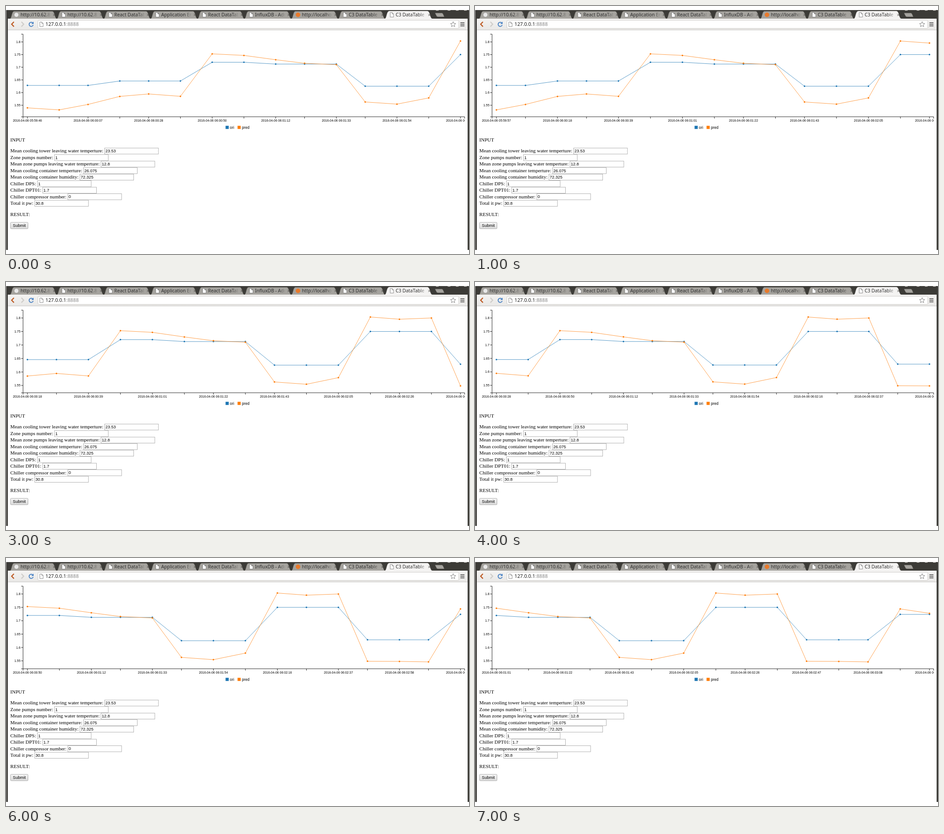
These frames come from a looping animation (1021 by 549 pixels, 8 s). An HTML page:

```html
<!DOCTYPE html>
<html lang="en">
<head>
<meta charset="utf-8">
<title>C3 DataTable</title>
<style>
html, body { margin: 0; width: 100%; height: 100%; overflow: hidden; background: #fff; }
svg { display: block; }
text { white-space: pre; }
.ui { font-family: "Noto Sans", sans-serif; }
.axis { font: 6.9px "Liberation Sans", sans-serif; }
.legend { font: 8.3px "Liberation Sans", sans-serif; }
.control { font: 9.2px "Liberation Sans", sans-serif; }
.page { font: 11.04px "Liberation Serif", serif; }
</style>
</head>
<body>
<svg width="1021" height="549" viewBox="0 0 1021 549">
  <defs>
    <linearGradient id="buttonFill" x2="0" y2="1"><stop stop-color="#f6f6f6"/><stop offset="1" stop-color="#dcdcdc"/></linearGradient>
    <linearGradient id="barFill" x2="0" y2="1"><stop stop-color="#f4f3f2"/><stop offset="1" stop-color="#e9e8e6"/></linearGradient>
    <clipPath id="plotClip"><rect y="54" width="1012" height="230"/></clipPath>
  </defs>
  <g id="browser" class="ui"></g>
  <g id="form"></g>
  <g id="chart" clip-path="url(#plotClip)"></g>
</svg>
<script>
const $ = id => document.getElementById(id);
const BLUE = '#1f77b4', ORANGE = '#ff7f0e';

const rect = (x, y, w, h, fill, more = '') =>
  `<rect x="${x}" y="${y}" width="${w}" height="${h}" fill="${fill}" ${more}/>`;
const path = (d, stroke, width = 1, fill = 'none') =>
  `<path d="${d}" stroke="${stroke}" stroke-width="${width}" fill="${fill}"/>`;
const text = (x, y, str, cls, more = '') =>
  `<text x="${x}" y="${y}" class="${cls}" ${more}>${str}</text>`;
const dot = (x, y, r, fill) => `<circle cx="${x}" cy="${y}" r="${r}" fill="${fill}"/>`;
const pageIcon = (x, y) =>
  path(`M${x} ${y}h4.5l3 3v7h-7.5zM${x + 4.5} ${y}v3h3`, '#777', 0.8, '#fafafa');

// Browser window
const tabs = ['http://10.62.8.', 'http://10.62.8.', 'React DataTab', 'Application Er', 'React DataTab',
  'InfluxDB - Adm', 'http://localhos', 'C3 DataTable', 'C3 DataTable'];

function drawTab(title, i) {
  const x = 8 + 103.4 * i, active = i === 8, fill = active ? '#f4f3f2' : '#a5a39e';
  const icon = i === 0 ? dot(x + 15, 19.5, 4.5, '#e8e8e8')
    : i === 6 ? dot(x + 15.5, 19.5, 5, '#e87a2c') : pageIcon(x + 12, 14.5);
  return `<clipPath id="tab${i}"><rect x="${x}" y="10" width="90" height="18"/></clipPath>
    <linearGradient id="fade${i}" gradientUnits="userSpaceOnUse" x1="${x + 76}" x2="${x + 92}">
      <stop stop-color="${fill}" stop-opacity="0"/><stop offset="1" stop-color="${fill}"/></linearGradient>`
    + path(`M${x} 28.5C${x + 5} 28 ${x + 4} 11.5 ${x + 10} 11.5H${x + 94}C${x + 100} 11.5 ${x + 99} 28 ${x + 105} 28.5`,
      active ? '#f4f3f2' : '#55534e', 0.8, fill)
    + text(x + 24, 23.4, title, '', `font-size="10.3" fill="#2e2e2e" clip-path="url(#tab${i})"`)
    + rect(x + 76, 13, 16, 14, `url(#fade${i})`) + icon
    + path(`M${x + 96} 17.5l4.5 4.5m0-4.5l-4.5 4.5`, '#55534f', 1);
}

function drawBrowser() {
  const star = Array.from({ length: 10 }, (_, i) => {
    const r = i % 2 ? 2.8 : 6.2, a = i * Math.PI / 5;
    return `${986 + r * Math.sin(a)} ${40.8 - r * Math.cos(a)}`;
  }).join('L');
  return rect(0.5, 9, 1020.5, 531, '#3c3b37')
    + rect(4, 53, 1014, 487, '#fff')
    + [948, 974, 992, 1010].map(x => rect(x, 9, 6, 1.2, '#c9c6c0')).join('')
    + path('M946 15.5h15q2 0 3 2.5l2.5 6h-14q-2.5 0-3.5-2.5z', '#55534e', 0.6, '#a5a39e')
    + tabs.map(drawTab).join('')
    + rect(4, 28, 1014, 25, 'url(#barFill)') + rect(4, 52.5, 1014, 1, '#c4c2bf')
    + rect(70.5, 31.5, 928, 18, '#fff', 'rx="2" stroke="#c4c2bf" stroke-width=".8"')
    + path('M17.5 35l-5 5.3l5 5.3', '#bd5a24', 2.4)
    + path('M34 35l5 5.3l-5 5.3', '#cfcdca', 2.4)
    + path('M59.3 37.8A4.6 4.6 0 1 0 60 42', '#4f86c6', 2)
    + path('M61 34.5v5.2h-5.2z', 'none', 0, '#4f86c6')
    + pageIcon(74.5, 35.5)
    + text(87, 44.3, '127.0.0.1<tspan fill="#858585">:8888</tspan>', '', 'font-size="10.8" fill="#222"')
    + path(`M${star}z`, '#777', 0.9, '#fff')
    + path('M1002 37h9m-9 3.5h9m-9 3.5h9', '#444', 1.7);
}

// Input form
const fields = [
  ['Mean cooling tower leaving water temperture', '23.53'], ['Zone pumps number', '1'],
  ['Mean zone pumps leaving water temperture', '12.8'], ['Mean cooling container temperture', '26.075'],
  ['Mean cooling container humidity', '72.325'], ['Chiller DPS', '1'], ['Chiller DPT01', '1.7'],
  ['Chiller compressor number', '0'], ['Total it pw', '30.8']];

function drawForm() {
  const form = $('form');
  form.innerHTML = text(9.6, 300, 'INPUT', 'page') + text(9.6, 465, 'RESULT:', 'page')
    + fields.map(([label], i) => text(9.6, 324.4 + 14.45 * i, label + ': ', 'page row')).join('');
  const inputs = [...form.querySelectorAll('.row')].map((row, i) => {
    const x = 9.8 + row.getComputedTextLength(), y = 314.4 + 14.45 * i;
    return rect(x, y, 118.6, 13.4, '#fff', 'stroke="#a8a8a8" stroke-width=".9"')
      + text(x + 1.7, y + 9.9, fields[i][1], 'control');
  });
  form.innerHTML += inputs.join('')
    + rect(10, 479, 38.5, 14, 'url(#buttonFill)', 'rx="1.5" stroke="#999" stroke-width=".8"')
    + text(15, 489.2, 'Submit', 'control');
}

// Sliding chart
const seconds = [0, 11, 21, 32, 42, 53, 64, 75, 86, 96, 107, 117, 128, 139, 150, 160, 171, 181, 192, 202, 213, 223];
const steps = [[1.6283, 3], [1.6458, 3], [1.7198, 2], [1.7127, 3], [1.6253, 3], [1.7501, 3], [1.6287, 3], [1.7237, 2]];
const ori = steps.flatMap(([value, count]) => Array(count).fill(value));
const pred = [1.5397, 1.5318, 1.5533, 1.585, 1.5946, 1.5853, 1.753, 1.7468, 1.7298, 1.7157, 1.7103,
  1.563, 1.5545, 1.579, 1.8036, 1.7955, 1.8, 1.5485, 1.548, 1.5462, 1.7442, 1.7278];
const POINTS = 15, TOP = 62.3, BOTTOM = 245.2;

const stamp = s => new Date(Date.UTC(2016, 3, 6, 5, 59, 46 + s)).toISOString().slice(0, 19).replace('T', ' ');

function drawChart(start) {
  const view = list => list.slice(start, start + POINTS);
  const times = view(seconds), values = [...view(ori), ...view(pred)];
  const max = Math.max(...values), range = max - Math.min(...values);
  const x = s => 47.2 + 955 * (s - times[0]) / (times[POINTS - 1] - times[0]);
  const y = v => TOP + (BOTTOM - TOP) * (max + 0.1 * range - v) / (1.2 * range);

  let axes = `M33.5 ${TOP}H37.6V${BOTTOM}H33.5M37.6 ${BOTTOM + 4}V${BOTTOM}H1011.3v4`, labels = '';
  for (const v of [1.55, 1.6, 1.65, 1.7, 1.75, 1.8]) {
    axes += `M33.5 ${y(v)}h4`;
    labels += text(31.8, y(v) + 2.4, v, 'axis', 'text-anchor="end"');
  }
  times.forEach((s, i) => {
    axes += `M${x(s)} ${BOTTOM}v4`;
    if (i % 2 === 0) labels += text(x(s), 256.3, stamp(s), 'axis', 'text-anchor="middle"');
  });
  const series = (list, color) => {
    const points = view(list).map((v, i) => [x(times[i]), y(v)]);
    return [path('M' + points.map(p => p.join(' ')).join('L'), color, 0.75),
      points.map(p => dot(...p, 1.75, color)).join('')];
  };
  const [blueLine, blueDots] = series(ori, BLUE), [orangeLine, orangeDots] = series(pred, ORANGE);
  $('chart').innerHTML = path(axes, '#000', 0.85) + labels
    + blueLine + blueDots + orangeLine + orangeDots
    + rect(484.2, 265.2, 7, 7, BLUE) + text(493.8, 271.6, 'ori', 'legend')
    + rect(510.6, 265.2, 7, 7, ORANGE) + text(520.2, 271.6, 'pred', 'legend');
}

$('browser').innerHTML = drawBrowser();
drawForm();

let shown = -1;
function tick() {
  const start = Math.floor(performance.now() / 1000) % 8;
  if (start !== shown) drawChart(shown = start);
  requestAnimationFrame(tick);
}
tick();
</script>
</body>
</html>
```
